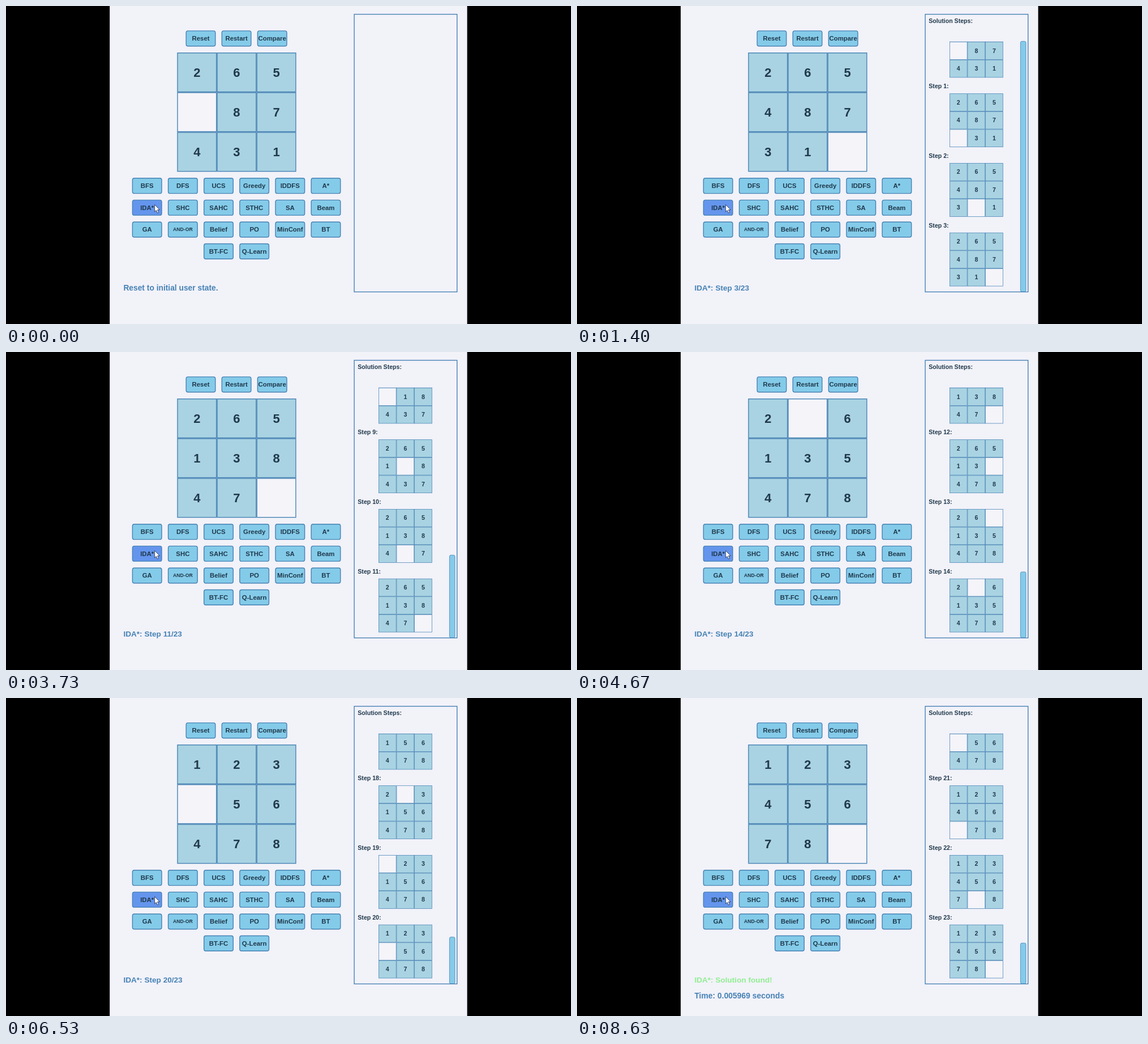
These frames come from a looping animation (998 px wide and 561 px high, 8.66 s). An HTML page:

```html
<!DOCTYPE html>
<html lang="en">
<head>
<meta charset="utf-8">
<title>Sliding puzzle solver</title>
<style>
html, body { margin: 0; width: 100%; height: 100%; overflow: hidden; background: #000; }
svg { display: block; width: 998px; height: 561px; }
text { font-family: "Liberation Sans", Arial, sans-serif; font-weight: bold; fill: #20394b; }
.mid { text-anchor: middle; }
.line { stroke: #4682b4; }
.tile { fill: #a9d3e2; }
.tile.blank { fill: #f4f4f9; }
.button { fill: #84cbe9; stroke-width: 1.4; }
.button.hover { fill: #6495ed; }
.status { fill: #4682b4; }
.status.done { fill: #90ee90; }
</style>
</head>
<body>
<svg id="stage" viewBox="0 0 998 561">
  <defs><clipPath id="view"><rect x="616" y="62.8" width="180" height="441"/></clipPath></defs>
  <rect x="183.2" width="631.4" height="561" fill="#f2f2f9"/>
</svg>
<script>
const LOOP = 8660, FIRST = 310, STEP = 310, LAST = 23;
const PITCH = 122.72;
const START = [2, 6, 5, 0, 8, 7, 4, 3, 1];
// Cell of the gap at every step
const GAP = [3, 6, 7, 8, 5, 4, 7, 6, 3, 4, 7, 8, 5, 2, 1, 4, 5, 2, 1, 0, 3, 6, 7, 8];

const stage = document.getElementById("stage");

function add(parent, name, attrs, text = "") {
  const el = document.createElementNS("http://www.w3.org/2000/svg", name);
  for (const key in attrs) el.setAttribute(key, attrs[key]);
  el.textContent = text;
  parent.appendChild(el);
  return el;
}

function label(parent, x, y, size, text, cls = "") {
  return add(parent, "text", { x, y, "font-size": size, class: cls }, text);
}

function button(x, y, text, size = 11.4) {
  const hover = text === "IDA*" ? " hover" : "";
  add(stage, "rect", { x, y, width: 51.6, height: 26.8, rx: 3.2, class: "button line" + hover });
  label(stage, x + 25.8, y + 13.4 + size * 0.35, size, text, "mid");
}

// Draws a 3x3 grid and returns a function that fills it with a state
function board(parent, left, top, cell, border, size) {
  const cells = START.map((_, i) => {
    const x = left + (i % 3) * cell, y = top + Math.floor(i / 3) * cell;
    const rect = add(parent, "rect", {
      x: x + border / 2, y: y + border / 2, width: cell - border, height: cell - border,
      "stroke-width": border
    });
    return { rect, text: label(parent, x + cell / 2, y + cell / 2 + size * 0.335, size, "", "mid") };
  });
  return state => state.forEach((n, i) => {
    cells[i].rect.setAttribute("class", n ? "tile line" : "tile blank line");
    cells[i].text.textContent = n || "";
  });
}

const states = [START];
for (let k = 1; k <= LAST; k++) {
  const next = states[k - 1].slice();
  next[GAP[k - 1]] = next[GAP[k]];
  next[GAP[k]] = 0;
  states.push(next);
}

["Reset", "Restart", "Compare"].forEach((name, i) => button(318.2 + i * 63.1, 43.9, name));
[
  ["BFS", "DFS", "UCS", "Greedy", "IDDFS", "A*"],
  ["IDA*", "SHC", "SAHC", "STHC", "SA", "Beam"],
  ["GA", "AND-OR", "Belief", "PO", "MinConf", "BT"],
  ["BT-FC", "Q-Learn"]
].forEach((row, r) => row.forEach((name, i) =>
  button(223.4 + (i + (6 - row.length) / 2) * 63.15, 303.8 + r * 38.57, name, name === "AND-OR" ? 8.7 : 11.4)));

const showBoard = board(stage, 302.3, 82.1, 70.1, 1.4, 22);
const status = label(stage, 207.4, 502, 13.6, "", "status");
const time = label(stage, 207.4, 530, 13.9, "Time: 0.005969 seconds", "status");

add(stage, "rect", { x: 615.1, y: 14.6, width: 181.6, height: 489.8, fill: "none", class: "line", "stroke-width": 1.4 });
const panel = add(stage, "g", {});
label(panel, 621.3, 29.6, 10.6, "Solution Steps:");
const list = add(add(panel, "g", { "clip-path": "url(#view)" }), "g", {});
const items = states.map((state, i) => {
  const item = add(list, "g", { transform: `translate(0 ${80.7 + i * PITCH})` });
  label(item, 621.3, -9, 10.6, `Step ${i}:`);
  board(item, 658, 0, 31.56, 0.75, 10.6)(state);
  return item;
});
const bar = add(panel, "rect", { x: 783.4, width: 9.6, rx: 2.5, class: "button line", style: "stroke-width:.8" });

add(stage, "path", {
  d: "M262.6 350.4v12.6l2.8-2.6 2 4.7 2.2-.9-2-4.6h3.8z",
  fill: "#fff", stroke: "#222a44", "stroke-width": 0.8
});

function show(el, on) {
  el.setAttribute("visibility", on ? "inherit" : "hidden");
}

function draw(tick) {
  const step = Math.max(0, Math.min(tick, LAST));
  const started = tick >= 0, done = tick > LAST;
  showBoard(states[step]);

  status.textContent = !started ? "Reset to initial user state."
    : done ? "IDA*: Solution found!" : `IDA*: Step ${step}/${LAST}`;
  status.setAttribute("font-size", started ? 13.6 : 13.8);
  status.setAttribute("class", done ? "status done" : "status");
  show(time, done);

  show(panel, started);
  items.forEach((item, i) => show(item, i <= step));
  const scroll = Math.max(0, (step + 1) * PITCH - 441.8);
  list.setAttribute("transform", `translate(0 ${-scroll})`);
  const height = 1776 / (step + 1) - 2;
  show(bar, scroll > 0);
  bar.setAttribute("y", 504.3 - height);
  bar.setAttribute("height", height - 0.4);
  // Nested groups must stay hidden with the panel
  panel.setAttribute("display", started ? "inline" : "none");
}

const origin = performance.now();
let shown = null;
function frame() {
  const t = (performance.now() - origin) % LOOP;
  const tick = Math.max(-1, Math.min(Math.floor((t - FIRST) / STEP), LAST + 1));
  if (tick !== shown) draw(shown = tick);
  requestAnimationFrame(frame);
}
frame();
</script>
</body>
</html>
```
